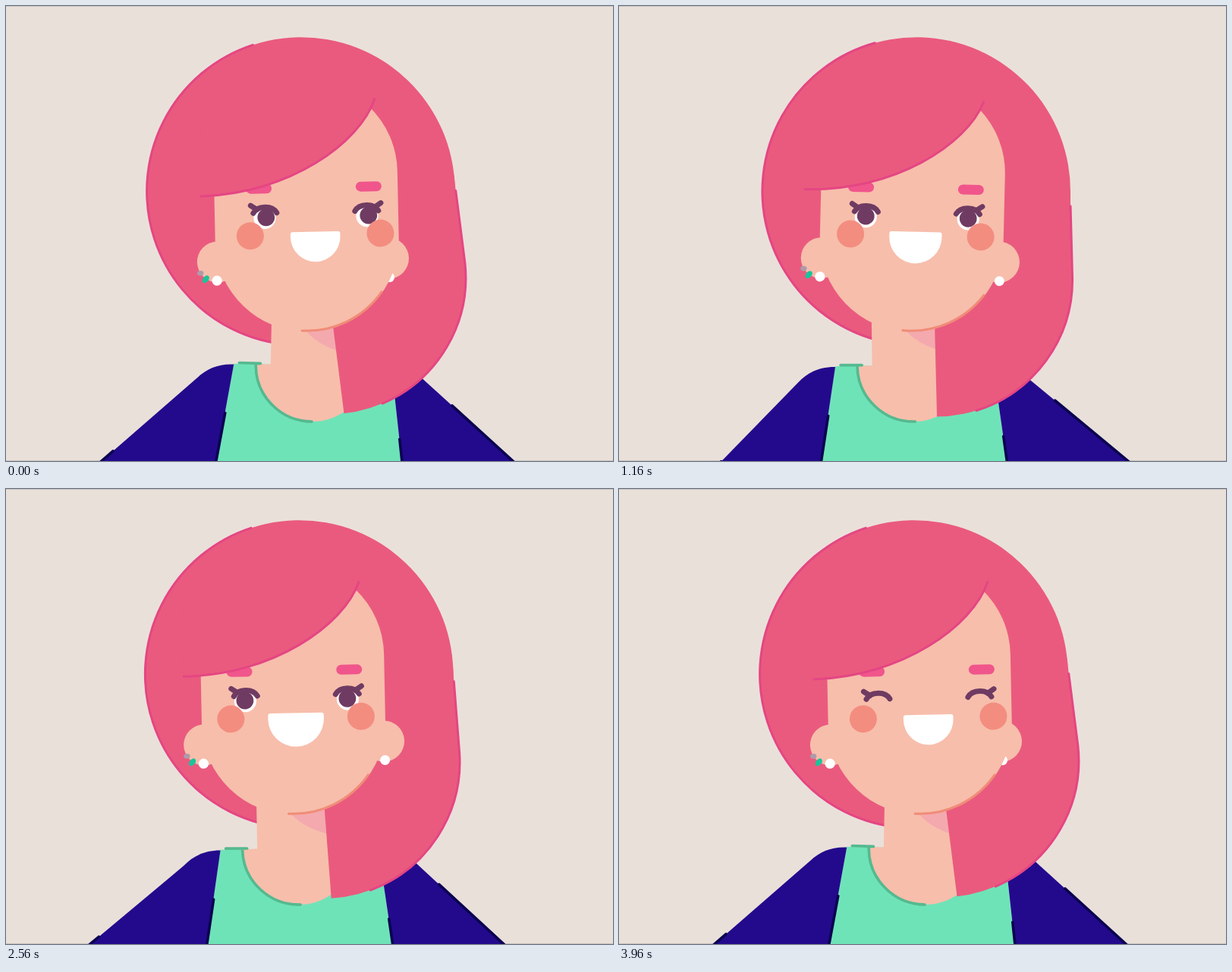
These frames come from a looping animation (800 px wide and 600 px high, 4000 ms). An HTML page:

```html
<!DOCTYPE html>
<html lang="en">
<head>
<meta charset="utf-8">
<title>Smiling girl</title>
<style>
  html, body { margin: 0; width: 100%; height: 100%; overflow: hidden; background: #eae0da; }
  svg { display: block; width: 100%; height: 100%; }
  .hair { fill: #ea5a7e; }
  .skin { fill: #f7beab; }
  .coat { fill: #230a8c; }
  .brow { fill: #f0558b; }
  .cheek { fill: #f38d80; }
  .line { fill: none; stroke-linecap: round; stroke-width: 3; }
  .pink { stroke: #e44683; }
  .navy { stroke: #0a0350; stroke-width: 3.6; }
  .green { stroke: #55b98f; stroke-width: 3.6; }
  .lid { stroke: #6f3b62; stroke-width: 7; }
</style>
</head>
<body>
<svg viewBox="0 0 800 600">
  <rect width="800" height="600" fill="#eae0da"/>
  <path d="M0 .5H800M0 599.5H800" stroke="#cbc3bf"/>

  <g id="back">
    <circle class="hair" r="203"/>
    <path class="line pink" d="M0-203A203 203 0 0 0 0 203" transform="rotate(-17)"/>
  </g>

  <g id="torso">
    <path fill="#6fe3b8" d="M291 473.7H500L504.8 520 523 660H261Z"/>
    <path id="coatL" class="coat"/>
    <path id="coatR" class="coat"/>
    <path id="cuffL" class="line navy"/>
    <path id="cuffR" class="line navy"/>
    <path class="line navy" d="M280.8 539 264 640M511.5 569 520.5 640"/>
    <path class="skin" d="M339.6 380V473.5H320A74.5 74.5 0 0 0 469 473.5H450V380Z"/>
    <path fill="#f4a9ae" d="M384 427Q401 447 432 455L450 458V410H384Z"/>
    <path class="line green" d="M298 472.3 326.2 472.7M320 474.5A74.7 74.2 0 0 0 395.3 548"/>
  </g>

  <g id="strand">
    <path class="hair" d="M203 0 203 21 205 117A180.5 180.5 0 0 1 25.5 297.5L22.5 140Z"/>
    <path class="line pink" d="M203 21 205 117A180.5 180.5 0 0 1 77.5 289.7"/>
  </g>

  <g id="head">
    <g id="earR">
      <circle class="skin" r="27"/>
      <circle cx="1" cy="25" r="6.5" fill="#fff"/>
    </g>
    <circle class="skin" cx="-118.4" cy="27" r="27"/>
    <rect class="skin" x="-121" y="-209" width="242" height="330.5" rx="121"/>
    <path class="line" stroke="#f08c78" d="M-9 120A120.4 120.4 0 0 0 97 71"/>
    <g transform="translate(-118.4 27)">
      <ellipse cx="-23" cy="14.5" rx="4.2" ry="3.4" fill="#ae9ba8"/>
      <ellipse cx="-16" cy="22.5" rx="5.6" ry="3.7" fill="#1cc39b" transform="rotate(-50 -16 22.5)"/>
      <circle cx="-1.3" cy="24.7" r="6.6" fill="#fff"/>
    </g>
    <g id="features">
      <g id="sides"></g>
      <path id="mouth" fill="#fff" d="M-30-19.8H30Q32.8-19.8 32.8-16.8V-13A32.8 32.8 0 0 1-32.8-13V-16.8Q-32.8-19.8-30-19.8Z"/>
    </g>
    <g id="bangs">
      <path class="hair" d="M0 0C-21 57-116 121-233 120.5L-230 0-160-50-20-40Z"/>
      <path class="line pink" d="M0 0C-21 57-116 121-233 120.5"/>
    </g>
  </g>
</svg>

<script>
const LOOP = 4000, STEP = 40, BLINK = 3880;
const $ = id => document.getElementById(id);

// Brow, eye and cheek for each side of the face
$('sides').innerHTML = [-1, 1].map(s => `
  <rect class="brow" x="${s * 72.4 - 17.9}" y="-74.5" width="34" height="13" rx="6.5"/>
  <g transform="translate(${s * 67.5 + 1.3} -29.5)">
    <g class="ball">
      <circle cy=".2" r="14.6" fill="#fff"/>
      <circle class="pupil" cy="-.4" r="11.4" fill="#6f3b62"/>
    </g>
    <g transform="scale(${-s} 1)">
      <path class="line lid" d="M-15-6.3C-9-16.5 10-16.5 16-6.3M-18.3-16.5-10-11"/>
    </g>
  </g>
  <circle class="cheek" cx="${s * 85.8}" cy="-6" r="18"/>`).join('');
const balls = document.querySelectorAll('.ball');
const pupils = document.querySelectorAll('.pupil');
const lids = document.querySelectorAll('.lid');

function place(id, x, y, turn = 0) {
  $(id).setAttribute('transform', `translate(${x} ${y}) rotate(${turn})`);
}

// Sleeve swings from its shoulder; a dark edge starts part way down
function sleeve(side, x, y, angle, start, top, foot) {
  const a = angle * Math.PI / 180, dir = side === 'L' ? -1 : 1;
  const at = d => `${x + dir * d * Math.cos(a)} ${y + d * Math.sin(a)}`;
  $('coat' + side).setAttribute('d', `${top} ${x} ${y}L${at(270)}${foot}`);
  $('cuff' + side).setAttribute('d', `M${at(start)}L${at(270)}`);
}

function draw(t) {
  // Eased 0..1 between two times
  const ramp = (from, to) => {
    const u = Math.min(1, Math.max(0, (t - from) / (to - from)));
    return (1 - Math.cos(Math.PI * u)) / 2;
  };
  const back = ramp(2400, 3600);
  const reach = ramp(0, 1680), spread = ramp(1680, 2300);

  const lean = 1.15 - 2.3 * (ramp(0, 1600) - back);
  const headX = 396.7 - 18.5 * (ramp(600, 1600) - back);
  const turn = 11.1 - 6.1 * ramp(0, 1200) - 2.1 * ramp(1700, 2400) + 8.2 * back;
  const tilt = -1.2 + 3.2 * (ramp(0, 640) - ramp(640, 2400));
  const smile = 1 + .122 * (ramp(700, 1680) - ramp(3040, 3900));
  const armL = 42.2 + 3.6 * reach - 7.1 * spread + 3.5 * back;
  const armR = 41.2 - reach + 3.7 * spread - 2.7 * back;

  // Hair counters the turn of the face
  const hairX = headX + 14.9 - 1.97 * turn + .9 * tilt;
  place('back', hairX, 244.2, tilt);
  place('strand', hairX, 244.2, 1.4 * tilt - .36 * turn - .4);

  $('torso').setAttribute('transform', `rotate(${lean} 395 934)`);
  sleeve('L', 242.3, 494, armL, 146, 'M291 474.5C268 474 253 483', 'L261 680 261 660Z');
  sleeve('R', 545, 492.8, armR, 46, 'M498.8 474C520 474 534 482', 'L523 680 523 660 504.8 520Z');

  place('head', headX, 308, tilt);
  place('earR', 123.4 - 1.5 * turn, 27);
  place('features', turn, .3 * tilt);
  place('bangs', 88.5 + .4 * turn, -183.5, .6 - .12 * turn);
  $('mouth').setAttribute('transform', `translate(0 10) scale(${smile})`);

  const shut = t >= BLINK;
  balls.forEach(b => b.setAttribute('visibility', shut ? 'hidden' : 'visible'));
  pupils.forEach(c => c.setAttribute('cx', .3 * (turn - 5)));
  lids.forEach(l => l.setAttribute('transform', `translate(0 ${shut ? 4 : 0})`));
}

const t0 = performance.now();
function tick() {
  const t = (performance.now() - t0) % LOOP;
  draw(Math.floor(t / STEP) * STEP);
  requestAnimationFrame(tick);
}
draw(0);
requestAnimationFrame(tick);
</script>
</body>
</html>
```
